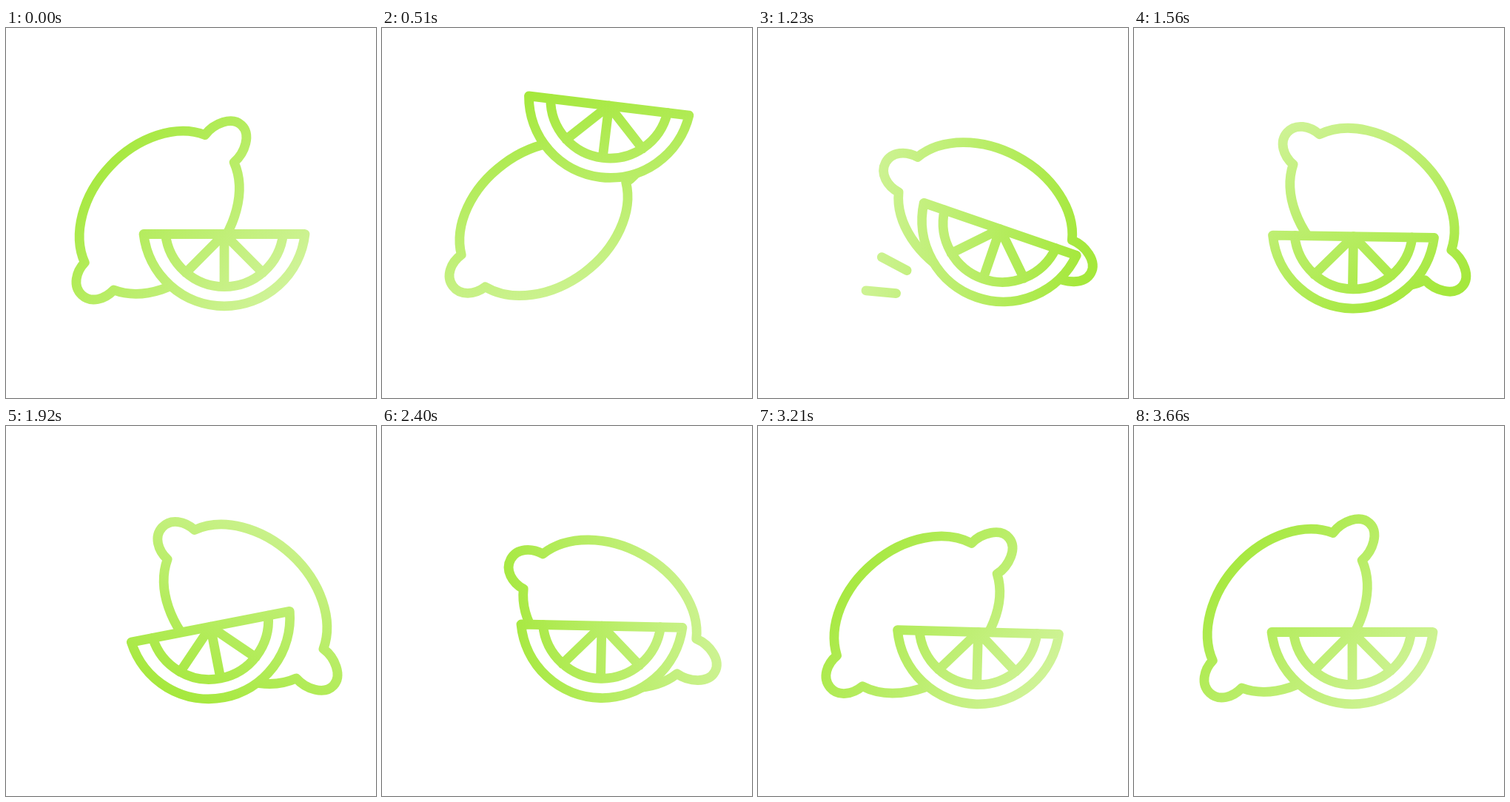
Recreate the animation shown at these times as an HTML page with a canvas. Size 500 by 500 pixels, loop 4190 ms.

```html
<!DOCTYPE html>
<html lang="en">
<head>
<meta charset="utf-8">
<title>Lime</title>
<style>
  html, body { margin: 0; width: 100%; height: 100%; overflow: hidden; background: #fff; }
  canvas { display: block; width: 500px; height: 500px; }
</style>
</head>
<body>
<canvas id="stage" width="500" height="500"></canvas>
<script>
const ctx = document.getElementById('stage').getContext('2d');
const LOOP = 4190, END = 3660, STEP = 30, RAD = Math.PI / 180;
const TURN = 1815, PEAK = 690, LAND = 1250;

const lemon = new Path2D(
  'M118.5-27 A124 91.3 0 0 0-118.5-27 C-136-27-153-17-153 0 S-136 27-118.5 27' +
  'A124 91.3 0 0 0 118.5 27 C138 29 162 18 162 0 S138-29 118.5-27Z');
const rind = new Path2D('M-109 12.7 A109.7 109.7 0 0 0 109 12.7Z');
const flesh = new Path2D(
  'M-79.5 12.7 A80 80 0 0 0 79.5 12.7 M0 12.7 V83.5 M-52 65 L0 12.7 L52 65');

const mix = (a, b, s) => a + (b - a) * s;
const part = (t, from, to) => Math.min(1, Math.max(0, (t - from) / (to - from)));
const smooth = s => s * s * (3 - 2 * s);

// S-curve: power sets the steepness, bias moves the middle earlier
function ease(s, power = 2.2, bias = 1) {
  const a = bias * s ** power;
  return a / (a + (1 - s) ** power);
}

// Smooth swing through turning points given as [ms, value]
function swing(points, t) {
  return points.reduce((v, [time, to], i) =>
    i ? mix(v, to, smooth(part(t, points[i - 1][0], time))) : to, 0);
}

const rock = [[0, 0], [LAND, 19], [1820, -13], [2260, 2], [2810, -3.3], [3250, 1.6], [END, 0]];
const bob = [[LAND, 8], [2200, -11], [2820, 0]];

function lift(t) {
  if (t < PEAK) return -191 * ease(t / PEAK);
  if (t < LAND) return mix(-191, 8, part(t, PEAK, LAND) ** 2);
  return swing(bob, t);
}

const rollAt = t => ease(t < TURN ? t / TURN : part(t, END, TURN));

function place(path, x, y, deg) {
  const out = new Path2D();
  out.addPath(path, new DOMMatrix().translate(x, y).rotate(deg));
  return out;
}

function ink(x, y, deg) {
  const dx = Math.cos(deg * RAD), dy = Math.sin(deg * RAD);
  const g = ctx.createLinearGradient(x - 160 * dx, y - 160 * dy, x + 145 * dx, y + 145 * dy);
  g.addColorStop(0, '#cff397');
  g.addColorStop(1, '#a5e83c');
  return g;
}

function drawLemon(u) {
  const a = Math.PI * u;
  const x = 207.25 + 116.5 * u - 2.9 * Math.sin(2 * a);
  const y = 249.25 - 8.75 * u + 20.2 * Math.sin(a) + 2.5 * Math.sin(3 * a);
  ctx.stroke(place(lemon, x, y, -46.7 + 89.6 * u));
}

// Two dashes shoot out from the landing point and shrink away
function drawDashes(t) {
  const s = part(t, 1110, 1500);
  if (s === 0 || s === 1) return;
  const near = mix(60, 205, s ** 1.45), far = mix(60, 205, s ** .67);
  ctx.beginPath();
  for (const [deg, reach] of [[208, .97], [185.4, 1.03]]) {
    const dx = reach * Math.cos(deg * RAD), dy = reach * Math.sin(deg * RAD);
    ctx.moveTo(275 + near * dx, 367 + near * dy);
    ctx.lineTo(275 + far * dx, 367 + far * dy);
  }
  ctx.stroke();
}

// The slice rolls on its rind, so its tilt also moves it sideways
function drawSlice(deg, rise) {
  const x = 295 + 109.7 * deg * RAD, y = 265.8 + rise;
  const edge = place(rind, x, y, deg);
  ctx.fillStyle = '#fff';
  ctx.fill(edge);
  ctx.stroke(edge);
  ctx.stroke(place(flesh, x, y, deg));
}

function draw(t) {
  const u = rollAt(t), rise = lift(t);
  ctx.clearRect(0, 0, 500, 500);
  ctx.lineWidth = 12.8;
  ctx.lineCap = ctx.lineJoin = 'round';
  ctx.strokeStyle = ink(250 + 60 * u, 248 + rise / 7, 223 + 360 * ease(t / END, 1.63, 2));
  drawLemon(u);
  drawDashes(t);
  drawSlice(swing(rock, t), rise);
}

const start = performance.now();
function tick() {
  const t = (performance.now() - start) % LOOP;
  draw(Math.min(END, Math.floor(t / STEP) * STEP));
  requestAnimationFrame(tick);
}
tick();
</script>
</body>
</html>
```
